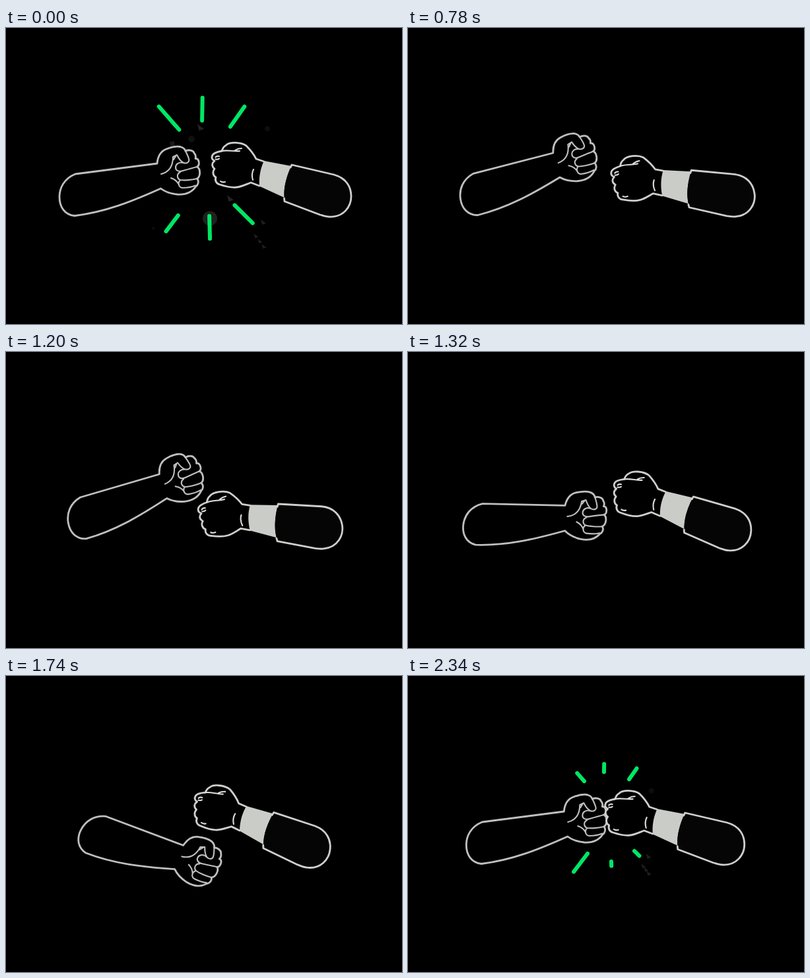
An HTML page for the animation above (2400 ms loop, 600 by 450 pixels).

```html
<!DOCTYPE html>
<html lang="en">
<head>
<meta charset="utf-8">
<title>Fist bump</title>
<style>
  html, body { margin: 0; width: 100%; height: 100%; overflow: hidden; background: #000; }
  svg { display: block; width: 600px; height: 450px; }
  path, line { stroke-linecap: round; stroke-linejoin: round; }
  .left path { fill: #000; stroke: #bfc0be; stroke-width: 2.8; }
  .right path { fill: #000; stroke: #cecfcc; stroke-width: 2.8; }
  .left .fine, .right .fine { fill: none; stroke-width: 2.1; }
  .right .fine { stroke: #dddfdb; }
  .right .cuff { fill: #cacdc7; stroke: none; }
  .right .cloth { fill: #040504; stroke: none; }
  .right .edge { fill: none; }
  #rays line { stroke: #00e765; stroke-width: 6; }
</style>
</head>
<body>
<svg viewBox="0 0 600 450">
  <g id="debris"></g>
  <g id="rays"></g>
  <g id="left" class="left">
    <path d="M229 206 L105 222 C88 229 81 243 81 257 C81 272 89 284 104 285.500 C150 280 190 264 234.500 244
      C241 249 249 252 260 253 C270 253.500 281 251 287.500 241 C291 239 293 233 289.500 229 C295 226 295 214 289.500 211
      C294 209 293 198 287 198.500 C288 195 287 192 285 190 C284 186 277 184.500 272 187
      C271 184 268 181.500 264 180.500 C258 179.500 252 180.500 243 184 C235 187 230 195 229 206 Z"/>
    <path class="fine" d="M235 222 C247 219 253 210 253 196 L259 193 C262 199 265 203 269 205
      C274 206.500 278.500 204 277 199 C276 195 274 191 272 187 M253 196 L257 195 L254 200
      M269 205 C262 203 257 207 257 212 C257 217 262 219 268 217 C275 215 282 213 289.500 211
      M264 219 C258 222 259 229 264 231 C270 232 282 231 289.500 229
      M264 231 C260 235 261 242 267 243 C275 243 281 242 287 239.500 M250 228 C256 230 260 234 262 238"/>
  </g>
  <g id="right" class="right">
    <path d="M391 203 L379 199 C376 193 370 185 364 179 C356 173.500 339 172.500 333 178.500 C330 180 328 184 327 187
      C321 188 315 190 313 193 C311 197 312 200 316 202 C311 206 312 211 316 214 C312 219 314 225 318 227
      C316 232 319 237 324 238 C333 241 343 243 350 242 C358 241 365 237 371 235 L384 240"/>
    <path class="fine" d="M327 187 C335 185 346 188 354 187 M347 186 C350 184 353 183 357 183
      M317.500 196.500 C319 194.500 321 194.500 323 195 M317.500 199.500 C320 200 322 199.500 323 198.500
      M325 233 C327 234.500 330 234.500 332 234 M375 215 C372.500 220 372.500 226 374 231"/>
    <path class="cuff" d="M391 202 L433 210 C424 228 420 245 422 258 L384 240.500 C383 225 386 212 391 202 Z"/>
    <path class="cloth" d="M433 208 L497 223 C515 228 523 241 523 256 C523 272 511 288 490 287
      C485 287 480 285 476 284 L422 264 C420 246 424 226 433 208 Z"/>
    <path class="edge" d="M431 212 L433 208 L497 223 C515 228 523 241 523 256 C523 272 511 288 490 287
      C485 287 480 285 476 284 L422 263.500 L421.500 259"/>
  </g>
</svg>
<script>
const LOOP = 2400, STEP = 60, HIT = 2340;
const CENTER = { x: 305, y: 225 };

// Each arm turns about its elbow; reach is towards the other fist, lift is upwards.
const ARMS = [
  {
    id: "left", x: 105, y: 254, dir: 1, recoil: 3.3, wide: 12.6, press: 10.8,
    up: { from: 740, to: 1370, reach: 28, lift: 22.7, turn: -21.8 },
    down: { reach: 51, lift: 37, turn: 46, turnFrom: 1210, turnTo: 1951 },
    drop: { by: 13, full: 1320, back: 1880 }
  },
  {
    id: "right", x: 490, y: 254, dir: -1, recoil: 6, wide: 32.7, press: 19.7,
    up: { from: 700, to: 1400, reach: 32, lift: 0, turn: -24 },
    down: { reach: 55, lift: 23, turn: 19, turnFrom: 1231, turnTo: 1846 },
    drop: { by: 20, full: 1500, back: 1980 }
  }
];

// x, y and direction of the inner end, full length, age at the hit
const RAYS = [
  [267, 160, -131, 62, .17],
  [297, 146, -89, 46, .17],
  [335, 157, -55, 49, .27],
  [272, 270, 127, 49, .5],
  [308, 282, 88.5, 48, .09],
  [343, 266, 45, 52, .13]
];

// shape, place, size, grey
const DEBRIS = [
  ["dot", 309, 289.5, 11, 32],
  ["dot", 281, 169, 5, 16],
  ["dot", 396, 153, 4, 13],
  ["box", 252, 176, 8, 27],
  ["tri", 295, 151, 10, 36],
  ["tri", 340, 259, 10, 36],
  ["tri", 390, 295, 8, 29],
  ["tri", 224, 304, 5, 18]
];
for (let i = 0; i < 3; i++) DEBRIS.push(["tri", 379 + 6 * i, 316 + 8 * i, 7, 30]);

const $ = id => document.getElementById(id);
const clamp = u => Math.min(1, Math.max(0, u));
const part = (t, from, to) => clamp((t - from) / (to - from));
const pulse = (t, from, to) => Math.sin(Math.PI * part(t, from, to)) ** 2;
const ramp = (t, from, to) => {
  const u = part(t, from, to);
  return u * u * (3 - 2 * u);
};

function make(parent, tag, attrs) {
  const el = document.createElementNS("http://www.w3.org/2000/svg", tag);
  set(el, attrs);
  return parent.appendChild(el);
}

function set(el, attrs) {
  for (const k in attrs) el.setAttribute(k, attrs[k]);
}

const rays = RAYS.map(() => make($("rays"), "line", {}));
const bits = DEBRIS.map(([shape, , , s, grey]) => {
  const fill = `rgb(${grey},${grey},${grey})`;
  if (shape === "dot") return make($("debris"), "circle", { r: s, fill });
  const d = shape === "box"
    ? `M${-s / 2} ${-s / 3} L${s / 3} ${-s / 2} L${s / 2} ${s / 2} L${-s / 3} ${s / 2} Z`
    : `M${-s / 2} ${-s / 2} L${s / 2} ${s / 4} L${-s / 4} ${s / 2} Z`;
  return make($("debris"), "path", { d, fill });
});

function moveArm({ id, x, y, dir, recoil, wide, press, up, down, drop }, t) {
  const rise = pulse(t, up.from, up.to), fall = pulse(t, 1250, 1960);
  const away = recoil * (1 - (1 - part(t, 0, 300)) ** 2) + wide * pulse(t, 1820, 2360);
  const reach = up.reach * rise + down.reach * fall + press * part(t, 2160, HIT) ** 2 - away;
  const sink = drop.by * (ramp(t, 780, drop.full) - ramp(t, drop.back, HIT));
  const dy = sink - up.lift * rise - down.lift * fall;
  const turn = up.turn * pulse(t, 640, 1360) + down.turn * pulse(t, down.turnFrom, down.turnTo);
  $(id).setAttribute("transform", `translate(${dir * reach} ${dy}) rotate(${turn} ${x} ${y})`);
}

// n counts steps since the hit
function burst(n) {
  RAYS.forEach(([x, y, angle, length, age], i) => {
    const a = age + n / 2;
    const head = length * Math.sin(Math.PI / 2 * clamp(a)), tail = length * .38 * a ** 3;
    const shown = tail < head;
    rays[i].style.display = shown ? "" : "none";
    if (!shown) return;
    const from = n ? tail : 0, r = angle * Math.PI / 180, dx = Math.cos(r), dy = Math.sin(r);
    set(rays[i], { x1: x + dx * from, y1: y + dy * from, x2: x + dx * head, y2: y + dy * head });
  });

  // far pieces show at once, near ones a step later
  const spread = 1.3 - .6 * .5 ** n;
  DEBRIS.forEach(([, x, y], i) => {
    const dx = x - CENTER.x, dy = y - CENTER.y;
    const shown = n < 4 && (n > 0 || dx > 0 && Math.hypot(dx, dy) > 100);
    bits[i].style.display = shown ? "" : "none";
    set(bits[i], {
      transform: `translate(${CENTER.x + dx * spread} ${CENTER.y + dy * spread})`,
      opacity: clamp(1.35 - .35 * n)
    });
  });
}

function draw(time) {
  let t = Math.floor((time % LOOP) / STEP) * STEP;
  if (t > 300 && t < 780) t = 300;
  ARMS.forEach(arm => moveArm(arm, t));
  burst(((t - HIT + LOOP) % LOOP) / STEP);
}

const start = performance.now();
function tick() {
  draw(performance.now() - start);
  requestAnimationFrame(tick);
}
tick();
</script>
</body>
</html>
```
